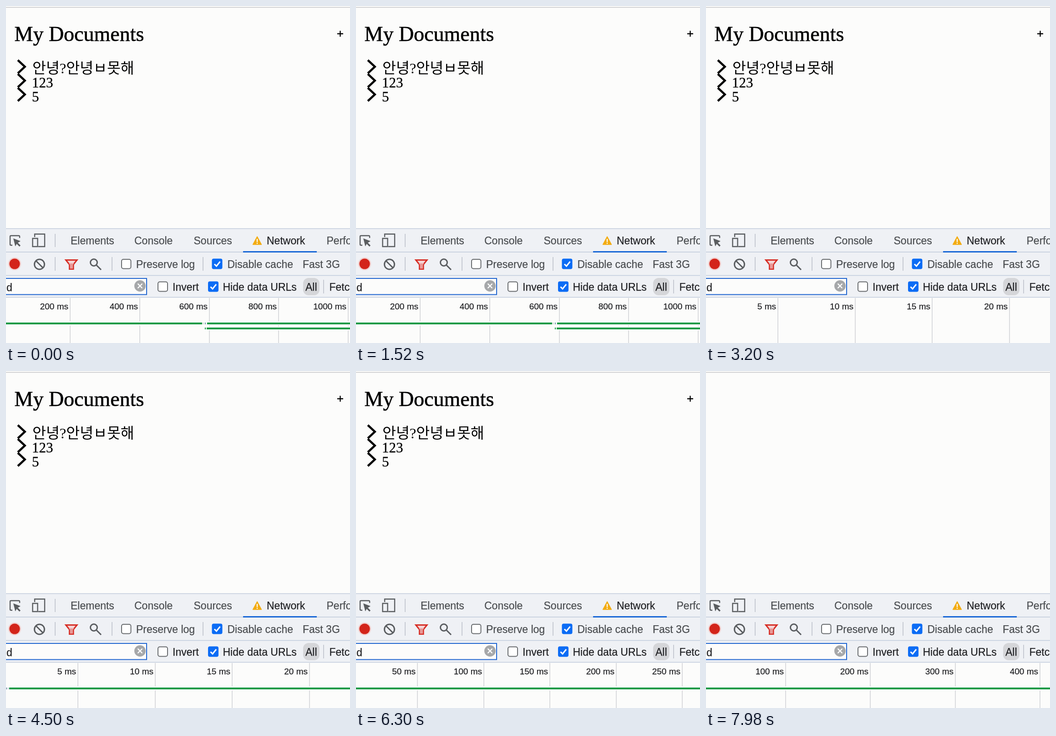
Recreate the animation shown at these times as an HTML page. Size 756x741 px, loop 8000 ms.

```html
<!DOCTYPE html>
<html lang="en">
<head>
<meta charset="utf-8">
<title>Network panel</title>
<style>
  html, body { margin: 0; width: 100%; height: 100%; overflow: hidden; background: #fcfcfb; }
  svg { display: block; width: 756px; height: 741px; }
  .page { font-family: "Liberation Serif", "Noto Sans CJK KR", "Noto Sans CJK", serif; font-size: 31px; fill: #000; }
  .page text { stroke: #000; stroke-width: 0.3; }
  .page .title { font-size: 46px; stroke-width: 0.6; }
  .page .korean { font-size: 32.5px; font-weight: 300; stroke: none; }
  .tools { font-family: "Liberation Sans", Arial, sans-serif; font-size: 23px; fill: #4a4d50; }
  .tools text { stroke: #4a4d50; stroke-width: 0.25; }
  .tools .dark { fill: #202124; stroke: #202124; }
  .tools .scale { font-size: 19px; }
  .icon { fill: none; stroke: #5a5d60; stroke-width: 2.4; }
  .rule { stroke: #c0cadb; stroke-width: 1.6; }
  .divider { stroke: #c6cad2; stroke-width: 2; }
  .box { fill: #fff; stroke: #6a6d70; stroke-width: 2; }
  .tick { fill: none; stroke: #fff; stroke-width: 3; }
</style>
</head>
<body>
<svg viewBox="0 0 756 741">
  <rect width="756" height="741" fill="#fcfcfb"/>
  <rect y="2" width="756" height="2" fill="#d2d2d4"/>

  <g id="page" class="page">
    <text class="title" x="18.5" y="76.5">My Documents</text>
    <path d="M728 61h13M734.5 54.5v13" stroke="#000" stroke-width="2.3"/>
    <g fill="none" stroke="#000" stroke-width="4.6">
      <path id="chevron" d="M26 119l15.5 14.500L26 148"/>
      <use href="#chevron" y="30.500"/>
      <use href="#chevron" y="61"/>
    </g>
    <text class="korean" x="58" y="148">안녕?안녕ㅂ못해</text>
    <text x="57" y="179">123</text>
    <text x="57" y="209.500">5</text>
  </g>

  <g class="tools">
    <rect y="489" width="756" height="152" fill="#eff1f5"/>
    <path class="rule" d="M0 489.500H756M0 541H756M0 592.500H756M0 640.500H756"/>
    <path class="divider" d="M108 501v29M108 552v30M233 552v30M433 552v30M698 602v30"/>

    <!-- tab row -->
    <path class="icon" d="M14 526H11Q9 526 9 524V507Q9 505 11 505H28Q30 505 30 507V510"/>
    <path d="M16 511l16 6-6 3.500 6 6-2.500 2.500-6-6-3 5.500z" fill="#5a5d60"/>
    <path class="icon" d="M63 508V501.500H85V529H71M58.500 511H69.500V529H58.500Z"/>
    <text x="142" y="524">Elements</text>
    <text x="282" y="524">Console</text>
    <text x="412.500" y="524">Sources</text>
    <path d="M552 507l9.500 17.500h-19z" fill="#f3ac12" stroke="#f3ac12" stroke-width="1.500" stroke-linejoin="round"/>
    <path d="M552 512v7M552 520.500v2.500" stroke="#fff" stroke-width="2.200"/>
    <text class="dark" x="573" y="524">Network</text>
    <rect x="521" y="539" width="162" height="3" fill="#1766d6"/>
    <text x="704.500" y="524">Performance</text>

    <!-- control row -->
    <circle cx="19" cy="567" r="14" fill="#f2cdcb"/>
    <circle cx="19" cy="567" r="11.500" fill="#d3241a"/>
    <g class="icon" style="stroke-width:3">
      <circle cx="73.500" cy="568" r="11"/>
      <path d="M66 560.500l15 15"/>
      <circle cx="193" cy="564" r="7.500"/>
      <path d="M198.500 569.500l10.500 10.500"/>
    </g>
    <path d="M131.500 558.500H156L148 568.500V578.500H139.500V568.500Z" fill="#f5d3d3" stroke="#d62f27" stroke-width="3"/>
    <path d="M138 566h11.500l-2.500 3v8.500h-6.500V569z" fill="#e99a98"/>
    <rect class="box" x="254" y="557" width="20.500" height="20.500" rx="4"/>
    <text x="286" y="575.500">Preserve log</text>
    <g id="checked">
      <rect x="452.500" y="555.500" width="23" height="23" rx="4" fill="#0b6cf5"/>
      <path class="tick" d="M458 567.500l4.500 4.500 8-10"/>
    </g>
    <text x="486.500" y="575.500">Disable cache</text>
    <text x="652" y="575.500">Fast 3G</text>

    <!-- filter row -->
    <rect x="-4" y="599" width="313" height="35.500" fill="#fcfcfb" stroke="#2065d0" stroke-width="2"/>
    <text class="dark" x="1" y="627">d</text>
    <circle cx="294.500" cy="615.500" r="12.500" fill="#a6a8aa"/>
    <path d="M289.500 610.500l10 10m0-10l-10 10" stroke="#fff" stroke-width="2.400"/>
    <rect class="box" x="334" y="606.500" width="21" height="21" rx="4"/>
    <text class="dark" x="366" y="625.500">Invert</text>
    <use href="#checked" x="-8.500" y="50"/>
    <text class="dark" x="476.500" y="625.500">Hide data URLs</text>
    <rect x="653" y="598" width="36" height="38" rx="12" fill="#d5d6d9"/>
    <text class="dark" x="658" y="625.500">All</text>
    <text class="dark" x="710.500" y="625.500">Fetch/XHR</text>

    <g id="timeline"></g>
  </g>
</svg>
<script>
const LOOP = 8000;
const PAGE_CLEARED = 7360;
const BAR_TOP = 696;
const page = document.getElementById("page");
const timeline = document.getElementById("timeline");

// first: x of the first grid line, gap: distance between lines, step: ms per line
const fine = { first: 158, gap: 169.5, step: 5 };
const phases = [
  { from: 0, first: 141, gap: 152.8, step: 200, bars: "history" },
  { from: 2880, ...fine, bars: "none" },
  { from: 4340, ...fine, bars: "started" },
  { from: 4720, first: 272.5, gap: 285.5, step: 50, bars: "started" },
  { from: 6220, first: 135, gap: 145.5, step: 50, bars: "full" },
  { from: 7740, first: 175, gap: 186.3, step: 100, bars: "full" },
];

const rect = (x, y, width, height, fill) =>
  `<rect x="${x}" y="${y}" width="${width}" height="${height}" fill="${fill}"/>`;

const strip = (x, y) => rect(x, y - 2, 756 - x, 8, "#fcfcfb");
const bar = (x, end, y = BAR_TOP) => rect(x, y, end - x, 4, "#129a46");

const barSets = {
  none: () => "",
  full: () => strip(0, BAR_TOP) + bar(0, 756),
  started: () => strip(0, BAR_TOP) + rect(0, BAR_TOP, 2, 4, "#8d9fb8") +
    rect(3, BAR_TOP, 4, 4, "#dce3ec") + bar(7, 756),
  history: () => strip(0, BAR_TOP) + strip(437, BAR_TOP + 11) +
    bar(0, 431) + rect(432, BAR_TOP, 3, 4, "#d5e6da") +
    rect(437, BAR_TOP, 2, 4, "#7d9fb4") + bar(442, 756) +
    bar(437, 439, BAR_TOP + 11) + bar(441, 756, BAR_TOP + 11),
};

function drawTimeline({ first, gap, step, bars }) {
  let grid = "";
  for (let i = 0, x = first; x < 756; i++, x += gap) {
    const line = Math.round(x);
    grid += rect(line - 1, 642, 2, 99, "#dadbde") +
      `<text class="scale dark" text-anchor="end" x="${line - 4}" y="667">${(i + 1) * step} ms</text>`;
  }
  timeline.innerHTML = grid + barSets[bars]();
}

let current;
function render(now) {
  const time = now % LOOP;
  const phase = phases.findLast(({ from }) => time >= from);
  if (phase !== current) drawTimeline(current = phase);
  page.style.display = time < PAGE_CLEARED ? "" : "none";
}

function tick() {
  render(performance.now());
  requestAnimationFrame(tick);
}
tick();
</script>
</body>
</html>
```
